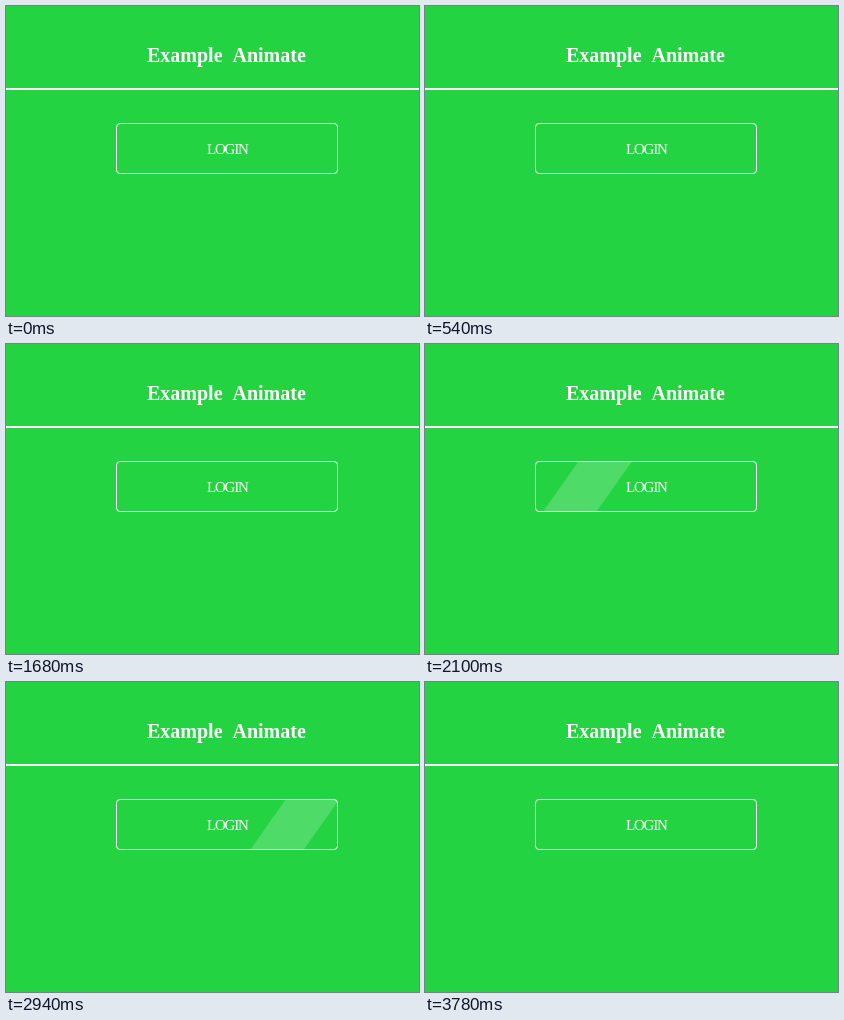
Write an HTML page that moves like this. It is 413 by 310 pixels and loops after 4.74 s.

```html
<!DOCTYPE html>
<html lang="en">
<head>
<meta charset="utf-8">
<title>Button shine</title>
<style>
  html, body { margin: 0; width: 100%; height: 100%; overflow: hidden; background: #24d341; }
  svg { display: block; width: 413px; height: 310px; }
  text { fill: #fff; font-family: "Liberation Serif", "Times New Roman", serif; }
  .title { font-size: 20px; font-weight: bold; word-spacing: 6px; }
  .label { font-size: 15px; letter-spacing: -1.2px; }
</style>
</head>
<body>
<svg viewBox="0 0 413 310">
  <clipPath id="inner"><rect x="111" y="118" width="220" height="49" rx="3"/></clipPath>
  <text class="title" x="141" y="56">Example Animate</text>
  <rect y="82" width="413" height="2" fill="#fff"/>
  <g clip-path="url(#inner)">
    <path id="shine" d="M-9.5 118H44L9.5 167H-44Z" fill="#fff" fill-opacity=".2"/>
  </g>
  <rect x="110.5" y="117.5" width="221" height="50" rx="3.5" fill="none" stroke="#fff"/>
  <text class="label" x="201" y="148">LOGIN</text>
</svg>
<script>
  const LOOP = 4740, STEP = 60;
  const LEFT = 60, RIGHT = 397;
  const EASE = 'cubic-bezier(.19, 1, .22, 1)';

  // start ms, duration ms, from, to
  const sweeps = [
    [160, 1000, LEFT, RIGHT],
    [1345, 550, RIGHT, LEFT],
    [2067, 550, LEFT, RIGHT],
    [2905, 550, RIGHT, LEFT],
    [3567, 550, LEFT, RIGHT]
  ];

  const key = (ms, x, easing = 'linear') =>
    ({ offset: ms / LOOP, transform: `translateX(${x}px)`, easing });

  const keys = [
    key(0, LEFT),
    ...sweeps.flatMap(([start, span, from, to]) =>
      [key(start, from, EASE), key(start + span, to)]),
    key(LOOP, RIGHT)
  ];

  const anim = document.getElementById('shine')
    .animate(keys, { duration: LOOP, fill: 'both' });
  anim.pause();

  const begin = performance.now();
  function draw() {
    const t = Math.max(0, performance.now() - begin) % LOOP;
    anim.currentTime = Math.floor(t / STEP) * STEP;
    requestAnimationFrame(draw);
  }
  draw();
</script>
</body>
</html>
```
